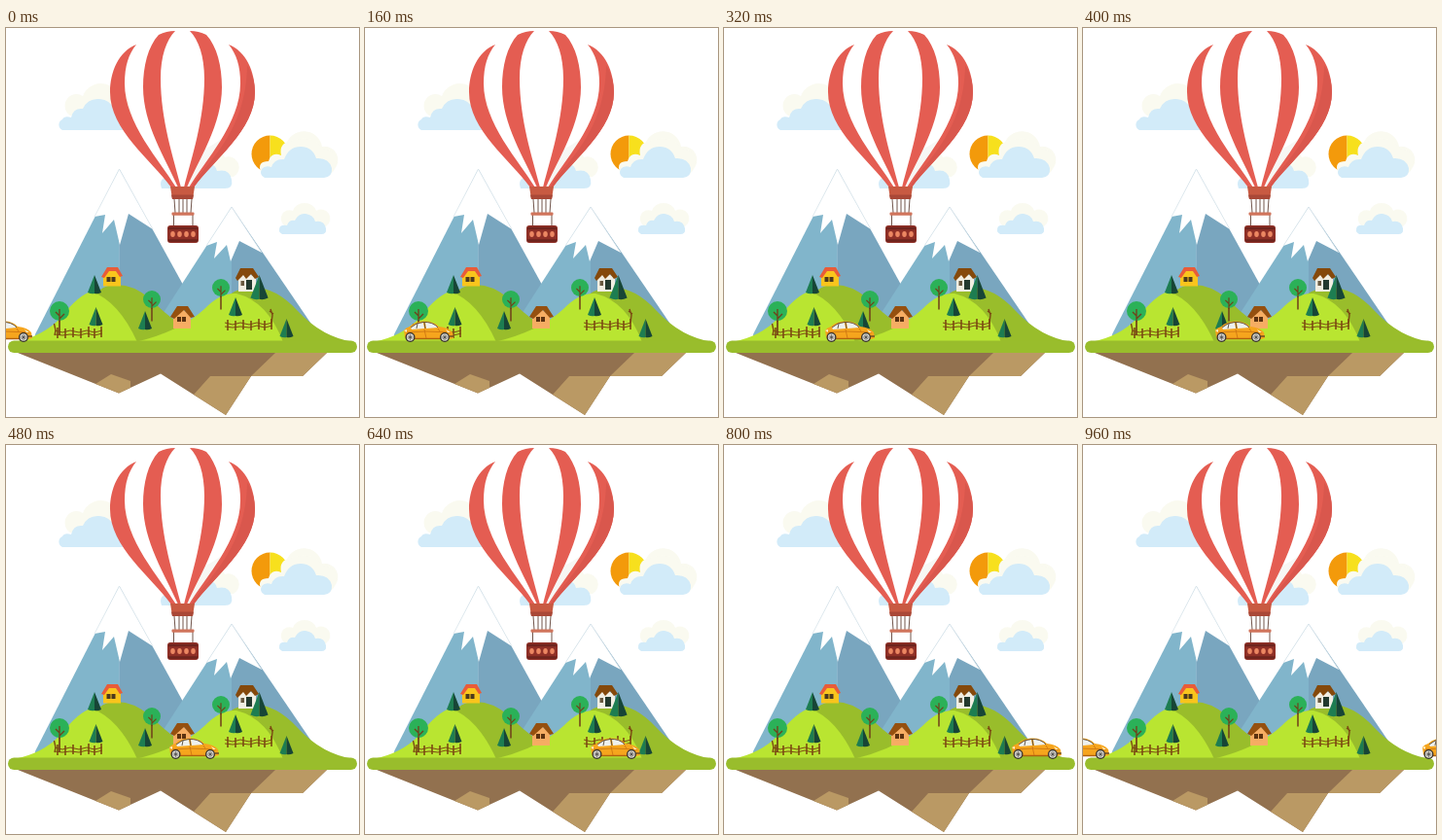
Animation, 363 px wide and 400 px high, one loop 1040 ms. Source, as an HTML page:

```html
<!DOCTYPE html>
<html lang="en">
<head>
<meta charset="utf-8">
<title>Balloon island</title>
<style>
html, body { margin: 0; width: 100%; height: 100%; overflow: hidden; background: #fff; }
svg { display: block; width: 100%; height: 100%; }
</style>
</head>
<body>
<svg viewBox="0 0 363 400">
  <defs>
    <g id="stripes" fill="#e45d52">
      <path d="M134 17C116 24 107 45 107 66C107 105 149 135 170 164H175C158 136 122 98 122 57C122 39 126 27 134 17Z"/>
      <path d="M174 3Q165 3 157 7C146 19 141 39 141 61C141 99 164 134 177 164H180C172 133 159 94 159 52C159 29 165 12 174 3Z"/>
    </g>
    <g id="pine">
      <path d="M0 0L-7 18Q-3 20 0 19Z" fill="#1d7d51"/>
      <path d="M0 0L7 18Q3 20 0 19Z" fill="#174536"/>
    </g>
    <g id="tree">
      <path d="M0-4V25M0 8L5 3M0 5L-4 1" stroke="#714019" stroke-width="1.7" fill="none"/>
      <circle r="10" fill="#2bb158"/>
      <path d="M0-2V11M0 8L5 3M0 5L-4 1" stroke="#714019" stroke-width="1.3" fill="none"/>
    </g>
    <g id="fence" fill="none" stroke="#7c4a12">
      <path d="M0 4L8 6L16 4L25 6L33 4L41 6L49 4M0 8L8 9L16 8L25 9L33 7L41 9L49 7" stroke-width="1"/>
      <path d="M3 1V12M11 2V12M19 1V11M27 2V12M35 0V11M41 2V12M48 0V11" stroke-width="1.6"/>
    </g>
    <g id="wheel">
      <circle r="5" fill="#35302b"/>
      <circle r="3.7" fill="#d6d5d0"/>
      <path d="M-3 0H3M0-3V3M-2-2L2 2M-2 2L2-2" stroke="#77736d" stroke-width=".8"/>
      <circle r="1.2" fill="#555"/>
    </g>
    <g id="car">
      <path d="M2 318L1 311Q3 308 7 307Q12 302 21 301.5Q31 301 37 307Q47 308 51 313L52 319L48 320H4Z" fill="#f6a51d"/>
      <path d="M8 308Q14 303 21 303L22 309L9 310ZM23 303Q31 302 36 308L24 309Z" fill="#eef1ee"/>
      <path d="M8 308Q14 302.5 21 302.5Q31 302 36 308M22 303L23 309M15 304L14 309" fill="none" stroke="#55483a" stroke-width=".9"/>
      <path d="M3 313L24 312L49 313M22 310L24 319M36 309L38 312" fill="none" stroke="#cf7712" stroke-width=".9"/>
      <path d="M11 319.5H39" stroke="#b3600e" stroke-width="1.5"/>
      <path d="M44 310L49 313L46 313ZM1 311L4 310L4 313Z" fill="#fff3cb"/>
      <path d="M48 317H52" stroke="#5b4021" stroke-width="1.3"/>
      <use href="#wheel" x="7.5" y="318"/>
      <use href="#wheel" x="43" y="318"/>
    </g>
  </defs>

  <!-- sky -->
  <g fill="#fafaf0">
    <path d="M66 90A10 10 0 0 1 79 70A20 20 0 0 1 116 69A13 13 0 0 1 124 94Z"/>
    <path d="M190 150A14 14 0 0 1 197 126A18 18 0 0 1 225 133A11 11 0 0 1 234 153Z"/>
    <path d="M288 204A8 8 0 0 1 295 188A13 13 0 0 1 319 188A9 9 0 0 1 329 204Z"/>
    <path d="M280 136A10 10 0 0 1 288 120A19 19 0 0 1 325 122A14 14 0 0 1 332 149Z"/>
  </g>
  <path d="M271.500 110.500A19 19 0 0 0 271.500 148.500Z" fill="#f39a0b"/>
  <path d="M271.500 110.500A19 19 0 0 1 271.500 148.500Z" fill="#f7e01d"/>
  <path d="M262 148Q258 137 270 137Q273 127 283 131Q280 118 294 116Q316 109 325 124Q344 126 339 142Q337 151 326 153Z" fill="#fafaf0"/>
  <g fill="#d2ebf9">
    <path d="M58 105A6 6 0 0 1 58 94Q60 90 67 92Q69 82 79 83Q84 72 96 73Q108 74 111 84Q123 82 126 94Q129 105 119 105Z"/>
    <path d="M160 165Q156 154 168 153Q173 141 188 144Q194 133 207 138Q216 141 217 147Q230 144 232 156Q234 165 225 165Z"/>
    <path d="M266 154Q260 151 263 145Q266 141 273 143Q276 134 286 135Q291 122 303 122Q315 122 319 134Q332 133 335 144Q336 153 327 154Z"/>
    <path d="M284 212Q279 209 282 204Q285 202 289 203Q291 197 297 198Q301 190 308 191Q316 192 318 199Q327 197 329 206Q330 212 324 212Z"/>
  </g>

  <!-- mountains -->
  <path d="M116.500 145L30 315V322H117Z" fill="#81b5cb"/>
  <path d="M116.500 145L214 322H116.500Z" fill="#79a6bf"/>
  <path d="M116.500 145L91 194L102 192L99 211L111 197L117 223L126 191L151 207Z" fill="#fff"/>
  <path d="M91 194L116.500 145L151 207" fill="none" stroke="#d4e1e8" stroke-width=".7"/>
  <path d="M232 184L145 319H232Z" fill="#81b5cb"/>
  <path d="M232 184L326 322H232Z" fill="#79a6bf"/>
  <path d="M232 184L206 224L217 220L214 237L227 223L231 240L240 219L263 231Z" fill="#fff"/>
  <path d="M206 224L232 184L263 231" fill="none" stroke="#d4e1e8" stroke-width=".7"/>

  <!-- island -->
  <path d="M12 334L116 375.500L159 355.500L226 398L252 358H305L330 334Z" fill="#92714f"/>
  <path d="M92 366L108 356L128 363V370L116 375.500ZM193 377L210 358H252L226 398ZM277 334H330L305 358H252Z" fill="#ba9964"/>
  <path d="M70 322Q83 271 105 265Q127 260 149 279Q176 307 211 322Z" fill="#99bd2b"/>
  <path d="M8 323Q39 317 57 297Q75 274 88 271Q116 281 135 323Z" fill="#b9e531"/>
  <path d="M200 322Q218 268 251 267Q276 265 300 291Q325 318 358 323Z" fill="#99bd2b"/>
  <path d="M133 323Q179 312 204 289Q220 272 237 273Q269 281 285 323Z" fill="#b9e531"/>
  <rect x="2" y="321.500" width="359" height="12.500" rx="6.250" fill="#99bd2c"/>

  <!-- houses -->
  <path d="M100 254L109 247L118 254V265.500H100Z" fill="#f9c51d"/>
  <path d="M98 256L104 246H115L120 255L117 256L113 250H106L101 257Z" fill="#e85c39"/>
  <path d="M103.500 256H107.500V261H103.500ZM108.500 256H112.500V261H108.500Z" fill="#4c3a1d"/>
  <path d="M172 296L181 289L190 296V309H172Z" fill="#f6ad63"/>
  <path d="M169 297L176 286H187L194 297L190 298L183 290L173 299Z" fill="#95500f"/>
  <path d="M176 297H180V302H176ZM181 297H185V302H181Z" fill="#5c3210"/>
  <path d="M239 257L247 251L257 257V271H239Z" fill="#f1eee2"/>
  <path d="M236 257L241 247H254L260 256L256 258L252 253L247 258L244 254L238 260Z" fill="#85490b"/>
  <path d="M247 259H253V269H247Z" fill="#23392e"/>
  <path d="M241.500 260H245V265H241.500Z" fill="#68583f"/>

  <g id="plants"></g>
  <use href="#fence" x="50" y="307"/>
  <use href="#fence" x="225" y="299"/>
  <path d="M49.500 304L51 311L50 316M272 289L274 295L273 303M271 291L275 294" fill="none" stroke="#7c4a12" stroke-width="1.400"/>

  <!-- balloon -->
  <path d="M134 17Q156 2 181.500 2Q207 2 229 17L241 57Q237 100 190 164H173Q126 100 122 57Z" fill="#fff"/>
  <path d="M234 100Q222 118 198 127L187 163H190Q212 133 234 100Z" fill="#f7f7f4"/>
  <use href="#stripes"/>
  <use href="#stripes" transform="matrix(-1 0 0 1 363 0)"/>
  <path d="M248 38Q256 51 256 66C256 105 214 135 193 164H190C207 137 247 108 248 38Z" fill="#d9574d"/>
  <path d="M169 163H194L192 176H171Z" fill="#c85a42"/>
  <path d="M170 171.500H193L192 176H171Z" fill="#a94837"/>
  <path d="M173 176L174 190M178 176V190M182 176V190M186 176V190M191 176L190 190M172.500 192V204M192 192V204" stroke="#70554b" stroke-width="1" fill="none"/>
  <rect x="170.500" y="189.500" width="23" height="3.200" rx="1" fill="#d0745b"/>
  <rect x="166" y="203" width="32" height="18" rx="3" fill="#8f3027"/>
  <path d="M167 206H197M167 218.500H197" stroke="#6d241e" stroke-width="2.500"/>
  <g fill="#ec8762">
    <ellipse cx="171.500" cy="212" rx="2.300" ry="3"/><ellipse cx="178.500" cy="212" rx="2.300" ry="3"/>
    <ellipse cx="185.500" cy="212" rx="2.300" ry="3"/><ellipse cx="192.500" cy="212" rx="2.300" ry="3"/>
  </g>

  <use href="#car" id="lead"/>
  <use href="#car" id="next"/>
</svg>
<script>
const STEP = 80, STEPS = 13, START = -25, SPEED = 32, WRAP = 373;
const $ = id => document.getElementById(id);
const place = (id, x, y, s = 1) =>
  `<use href="#${id}" transform="translate(${x} ${y}) scale(${s})"/>`;

$('plants').innerHTML =
  [[55, 291], [150, 279, .9], [221, 267, .9]].map(p => place('tree', ...p)).join('') +
  [[91, 254], [92.5, 287], [143, 291], [236, 277], [260.5, 254, 1.3], [288.5, 299]]
    .map(p => place('pine', ...p)).join('');

function draw(now) {
  const step = Math.floor(now / STEP) % STEPS;
  const last = step === STEPS - 1;
  // On the last step the next car already stands at the start.
  $('lead').setAttribute('x', last ? START + WRAP : START + step * SPEED);
  $('next').setAttribute('x', last ? START : -100);
}

let begin;
function tick(now) {
  begin ??= now;
  draw(now - begin);
  requestAnimationFrame(tick);
}
draw(0);
requestAnimationFrame(tick);
</script>
</body>
</html>
```
